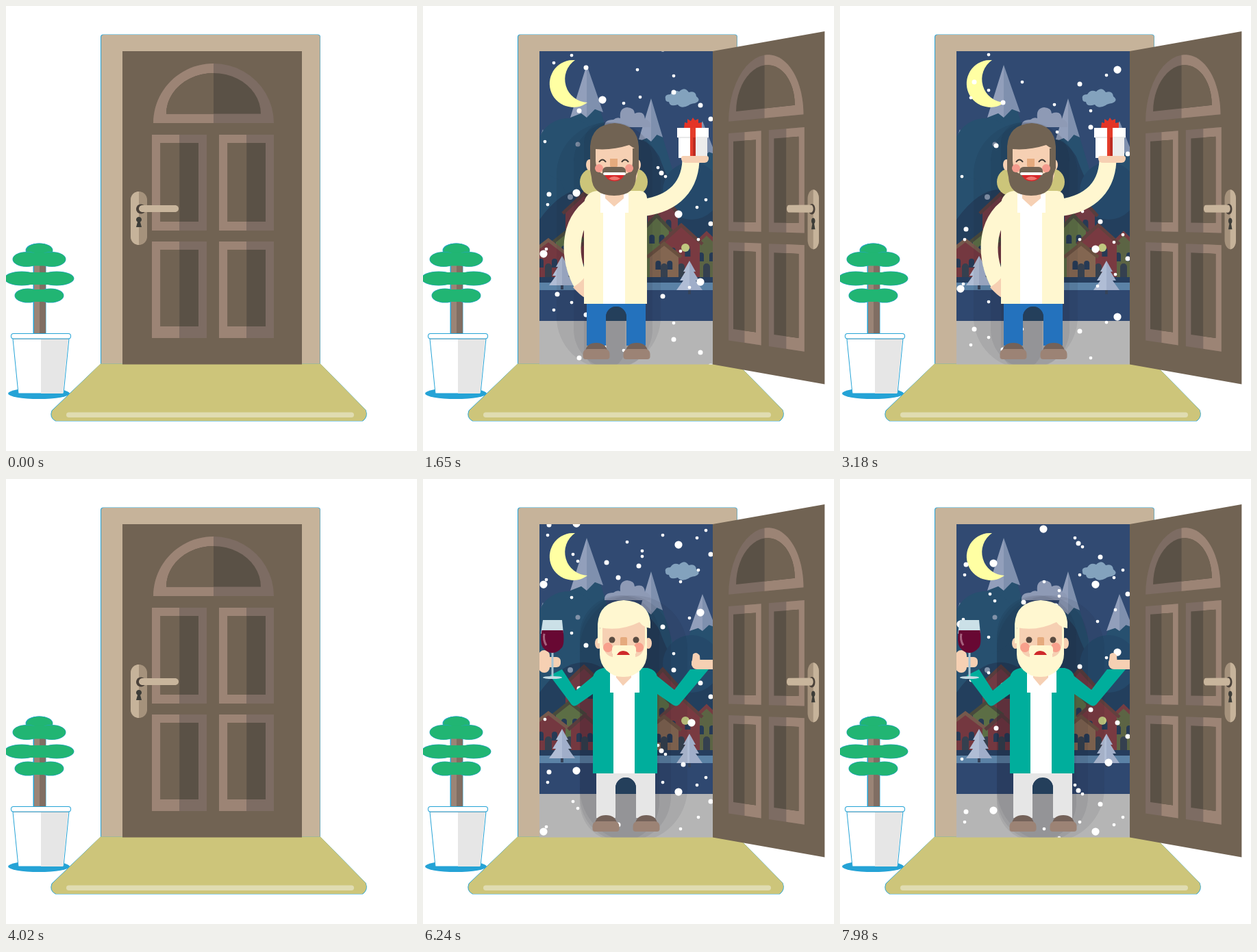
These frames come from a looping animation (600 by 650 pixels, 8000 ms). An HTML page with a canvas:

```html
<!DOCTYPE html>
<html lang="en">
<head>
<meta charset="utf-8">
<title>Winter visitors</title>
<style>
html, body { margin: 0; width: 100%; height: 100%; overflow: hidden; background: #fff; }
canvas { display: block; }
</style>
</head>
<body>
<canvas id="stage" width="600" height="650"></canvas>
<script>
const ctx = document.getElementById('stage').getContext('2d');
const PI = Math.PI;
const LOOP = 8000, SWING = 514;
const SKIN = '#f6d0b3', BROWN = '#716353', CREAM = '#fff7d0', TEAL = '#00ae9c', BLUE = '#25a3d6';

function shape(color, d, edge) {
  const path = new Path2D(d);
  ctx.fillStyle = color;
  ctx.fill(path);
  if (edge) { ctx.strokeStyle = edge; ctx.lineWidth = 1; ctx.stroke(path); }
}
function line(color, width, d) {
  ctx.strokeStyle = color;
  ctx.lineWidth = width;
  ctx.stroke(new Path2D(d));
}
function rect(color, x, y, w, h, r = 0) {
  ctx.fillStyle = color;
  ctx.beginPath();
  ctx.roundRect(x, y, w, h, r);
  ctx.fill();
}
function oval(color, x, y, rx, ry = rx) {
  ctx.fillStyle = color;
  ctx.beginPath();
  ctx.ellipse(x, y, rx, ry, 0, 0, 2 * PI);
  ctx.fill();
}

// ---- Snow: one tile of flakes, x/y pairs grouped by size ----
const TILE = 361;
const snow = [
  { r: 5.6, at: [373,249, 176,307, 405,348, 262,82, 392,148, 224,218, 297,168] },
  { r: 3.5, at: [238,35, 350,8, 405,90, 228,98, 420,110, 366,71, 348,189, 380,209,
                 420,263, 315,280, 268,275, 285,297, 184,220, 196,5] },
  { r: 2.4, at: [313,38, 366,47, 293,87, 317,78, 217,17, 191,28, 266,5, 343,181, 354,194,
                 178,143, 182,235, 350,235, 400,239, 413,228, 298,245, 320,258, 320,266,
                 219,263, 226,273, 402,286, 376,303, 217,326, 180,300, 389,356] }
];
function drawSnow(t) {
  for (const { r, at } of snow)
    for (let i = 0; i < at.length; i += 2) {
      const y = (at[i + 1] + t / 30) % TILE;
      oval('#fff', at[i], y, r);
      oval('#fff', at[i], y + TILE, r);
    }
}

// ---- Landscape ----
function peak(x, y, left, right, capY, slope) {
  const h = capY - y;
  shape('#27506f', `M${x} ${y}L${x - slope * 230} ${y + 230}H${x + slope * 230}Z`);
  shape('#929fbb', `M${x} ${y}L${x - left} ${capY}L${x - left / 3} ${capY - h * .08}L${x} ${capY}Z`);
  shape('#7f90ae', `M${x} ${y}L${x + right} ${capY - h * .1}L${x + right / 2} ${capY - h * .16}L${x} ${capY}Z`);
}
function house(x, top, half, eaves, wall, roof) {
  shape(wall, `M${x} ${top}L${x + half} ${eaves}V396H${x - half}V${eaves}Z`);
  line(roof, 5, `M${x - half - 4} ${eaves + 3}L${x} ${top}L${x + half + 4} ${eaves + 3}`);
  rect('#263a55', x - half * .6, eaves + 8, 8, 13, [4, 4, 0, 0]);
  rect('#263a55', x + half * .2, eaves + 8, 8, 13, [4, 4, 0, 0]);
  rect('#35404f', x - 5, 376, 10, 20, [5, 5, 0, 0]);
}
function pine(x, y) {
  rect('#36435a', x - 2, y + 40, 4, 9);
  const tiers = side => `M${x} ${y}L${x + 9 * side} ${y + 16}L${x + 6 * side} ${y + 16}L${x + 14 * side} ${y + 29}` +
    `L${x + 9 * side} ${y + 29}L${x + 19 * side} ${y + 43}H${x}Z`;
  shape('#b0bdd5', tiers(-1));
  shape('#a0aec9', tiers(1));
}
function landscape() {
  rect('#314a72', 170, 66, 262, 394);
  peak(239, 86, 24, 24, 163, .3);
  peak(175, 180, 14, 11, 222, .35);
  peak(408, 168, 19, 19, 222, .32);
  peak(333, 135, 19, 17, 198, .3);
  shape('#233f5d', 'M170 312Q215 250 260 275Q300 150 345 220Q380 320 432 290V400H170Z');
  oval('#27506f', 212, 210, 46);
  oval('#25496a', 392, 270, 42);
  shape('#8e9ab5', 'M265 177Q264 166 278 166Q283 162 288 164Q286 149 298 148Q309 149 309 157Q323 152 324 165Q333 167 332 177Z');
  shape('#83a2bd', 'M354 136Q352 129 361 129Q366 121 374 125Q382 117 388 126Q398 123 399 132Q407 138 397 142Q390 143 388 145Q377 151 372 144Q360 148 359 140Q354 140 354 136Z');
  shape('#ffffa3', 'M222 79A34.5 34.5 0 1 0 240 141A34 34 0 0 1 222 79Z');

  house(235, 274, 27, 300, '#713a43', '#593d3d');
  house(350, 278, 22, 304, '#713a43', '#593d3d');
  house(214, 326, 20, 342, '#5c6e45', '#494a3c');
  house(341, 306, 18, 326, '#5c6e45', '#494a3c');
  house(183, 342, 25, 361, '#743840', '#76594c');
  house(236, 345, 20, 363, '#743840', '#593d3d');
  house(414, 332, 20, 352, '#5c6444', '#763d42');
  house(377, 320, 27, 345, '#793a41', '#63403e');
  house(352, 347, 21, 364, '#836651', '#69503f');
  oval('#c0c77f', 383, 353, 6);

  rect('#263e5e', 170, 396, 262, 9);
  rect('#5b82a6', 170, 404, 262, 11);
  rect('#2f4870', 170, 415, 262, 45);
  rect('#b5b5b5', 170, 460, 262, 64);
  pine(203, 365);
  pine(389, 372);
  oval('#8292a8', 226, 202, 3.5);
  oval('#8292a8', 215, 279, 4);
}
function shadeBehind(bands) {
  for (const [x0, x1] of bands) rect('rgba(20,25,30,.07)', x0, 170, x1 - x0, 360, (x1 - x0) / 2);
}

// ---- People ----
function legs(color, x, y, bottom) {
  shape(color, `M${x - 43} ${y}H${x + 43}V${bottom}H${x + 15}V${y + 21}A15 15 0 0 0 ${x - 15} ${y + 21}V${bottom}H${x - 43}Z`);
  shape('#243f5b', `M${x - 15} 460V${y + 21}A15 15 0 0 1 ${x + 15} ${y + 21}V460Z`);
  for (const foot of [x - 29, x + 30]) {
    shape('#746259', `M${foot - 16} ${bottom + 8}Q${foot - 14} ${bottom - 4} ${foot} ${bottom - 4}Q${foot + 14} ${bottom - 4} ${foot + 16} ${bottom + 8}Z`);
    rect('#9c8375', foot - 19.5, bottom + 5, 39, 15, [7, 7, 4, 4]);
  }
}
function giftVisitor() {
  legs('#2472bd', 282, 433, 496);
  rect('#ccc57a', 229, 237, 99, 40, 20);
  line(CREAM, 25, 'M249 291C211 315 211 370 233 407');
  line(CREAM, 25, 'M315 295C358 292 389 270 391 226');
  shape(SKIN, 'M219 411Q233 402 239 392Q252 399 251 413Q248 424 236 426Q230 423 219 411Z');
  rect(CREAM, 235, 270, 92, 165, [20, 10, 0, 0]);
  rect('#fff', 263, 285, 32, 150);
  shape('#fff', 'M259 274H300V302H259Z');
  shape(SKIN, 'M266 272H293V281L279 293L266 281Z');

  oval(SKIN, 243, 232, 5, 8);
  oval(SKIN, 313, 232, 5, 8);
  rect(SKIN, 246, 182, 67, 90, 28);
  shape(BROWN, 'M244 240V205Q246 173 280 171Q313 173 315 205V210Q309 209 301 203Q276 211 252 209V226Q253 244 264 245H296Q306 243 306 226V208H315V237L311 248Q311 277 279 277Q247 277 246 250Z');
  oval('#f49b8d', 257, 237, 6);
  oval('#f49b8d', 301, 237, 6);
  shape('#e5aa7d', 'M273 223H284V234Q279 239 273 234Z');
  rect(BROWN, 262, 235, 34, 11, [6, 6, 2, 2]);
  shape('#d7282b', 'M264 244H295Q291 256 279 256Q268 256 264 244Z');
  rect('#fff', 263, 243, 33, 4, 2);
  shape('#ef7770', 'M271 252Q279 246 288 252Q280 257 271 252Z');
  line('#403a34', 2, 'M257 228Q262 221 267 228M290 228Q295 221 300 228');

  rect('#fff', 373, 191, 42, 31);
  rect('#ececec', 398, 193, 17, 29);
  rect('#fff', 371, 178, 46, 14);
  rect('#d4d4d4', 372, 191.5, 44, 1);
  rect('#e43c2a', 390, 178, 8, 44);
  rect('#bd2c22', 394, 192, 4, 30);
  shape('#e43427', 'M381 178L382 170L386 171L386 165L391 168L394 163L397 167L402 165L402 171L407 170V178Z');
  rect(SKIN, 377, 219, 40, 10, [3, 3, 6, 6]);
}
function wineVisitor() {
  legs('#e6e6e6', 296, 430, 495);
  shape(TEAL, 'M263 276L223 309L203 278L185 287L215 327Q219 334 225 330L248 314Z');
  shape(TEAL, 'M327 276L367 308L390 278H417L376 327Q371 334 365 330L342 314Z');
  shape(TEAL, 'M248 430V290Q250 278 264 276H328Q341 279 342 290V430Z');
  rect('#fff', 278, 290, 31, 140);
  rect('#fff', 273, 278, 43, 34);
  shape(SKIN, 'M282 280H304V290L292 302L282 290Z');

  oval(SKIN, 256, 240, 5, 8);
  oval(SKIN, 329, 240, 5, 8);
  rect(CREAM, 258, 200, 69, 89, [20, 20, 33, 33]);
  shape(SKIN, 'M262 205H324V240Q322 258 310 260H277Q264 258 262 240Z');
  shape(CREAM, 'M255 240V212Q257 179 293 177Q329 179 332 209V218Q322 217 316 209Q288 223 258 217V240Z');
  oval('#f8a08c', 270, 246, 7);
  oval('#f8a08c', 315, 246, 7);
  oval('#5a4b41', 276, 235, 4.5);
  oval('#5a4b41', 311, 235, 4.5);
  rect('#e5aa7d', 288, 231, 10, 14, 2);
  rect(CREAM, 276, 243, 35, 12, [5, 5, 0, 0]);
  rect(CREAM, 277, 253, 33, 12);
  shape('#cf2a2b', 'M283 257Q286 251 292 251Q299 251 302 257Z');

  rect(SKIN, 392, 264, 36, 14, [4, 0, 0, 8]);
  shape(SKIN, 'M392 272L394 256Q399 251 404 258L405 272Z');
  rect(SKIN, 169, 250, 16, 33, 8);
  rect(SKIN, 175, 260, 26, 15, 6);
  line('#a9c6d4', 3, 'M189 252V290');
  oval('#c5dbe3', 189, 290, 14, 2);
  shape('#cbe0e7', 'M175 206H203L205 226H172Z');
  shape('#680833', 'M173.500 221H204.500Q207 240 203 246Q196 254 189 254Q181 254 175 246Q170 239 173.500 221Z');
  line('#a6617e', 3, 'M177 226Q175 235 180 243');
}

// ---- Entrance ----
function plant() {
  oval(BLUE, 48, 566, 45, 8);
  shape('#fff', 'M10 486H92L84 566H18Z', BLUE);
  shape('#e6e6e6', 'M51 486H91L83 566H51Z');
  rect('#b8b1b1', 11, 484, 80, 3);
  ctx.lineWidth = 1;
  rect(BLUE, 7, 478, 88, 8.500, 4);
  rect('#fff', 8, 479, 86, 6.500, 3);
  rect(BLUE, 39.500, 375, 19, 103);
  rect('#9b8476', 41, 375, 8, 103);
  rect('#806e63', 49, 375, 9, 103);
  const leaf = (x, y, rx, ry) => { oval(BLUE, x, y, rx + .5, ry + .5); oval('#21b573', x, y, rx, ry); };
  for (const [y, gap, rx, ry] of [[357, 0, 19, 10], [370, 18, 20, 10.5], [398, 25, 25, 10], [423, 16, 19, 10]]) {
    leaf(48 - gap, y, rx, ry);
    leaf(49 + gap, y, rx, ry);
    rect('#21b573', 49 - gap, y - ry + 1, 2 * gap, 2 * ry - 2);
  }
}
function step() {
  shape('#cdc57a', 'M138 523H459L525 590Q529 600 521 606H72Q63 601 67 591Z', BLUE);
  shape('#cdc57a', 'M138 522.500H459L525 590Q528 600 520 606H73Q64 601 68 591Z');
  rect('#e0dcb1', 88, 593.500, 420, 7.500, 4);
}

// ---- Door: flat coordinates projected around its hinge ----
function drawDoor(open, hinge) {
  const angle = open * 123.6 * PI / 180;
  const rise = 30 * Math.sin(.85 * angle);
  const near = 1 + 2 * rise / 457;
  const reach = -262 * Math.cos(angle) * near;
  const project = ([x, y]) => {
    const u = (432 - x) / 262;
    const f = (u / near) / (1 - u + u / near);
    return [hinge + reach * f, 66 - rise * f + (y - 66) * (1 + 2 * rise * f / 457)];
  };
  const face = (color, points) => {
    ctx.fillStyle = color;
    ctx.beginPath();
    points.forEach(p => ctx.lineTo(...project(p)));
    ctx.fill();
  };
  const block = (color, x0, y0, x1, y1) => face(color, [[x0, y0], [x1, y0], [x1, y1], [x0, y1]]);
  const arc = (cx, cy, rx, ry, from, to) => Array.from({ length: 25 }, (_, i) => {
    const a = from + (to - from) * i / 24;
    return [cx + rx * Math.cos(a), cy + ry * Math.sin(a)];
  });
  const arch = (y, rx, ry, light, dark) => {
    face(dark, arc(303, y, rx, ry, PI, 2 * PI));
    face(light, [[303, y], ...arc(303, y, rx, ry, PI, 1.5 * PI)]);
  };
  const panel = (x0, y0, x1, y1, light, dark) => {
    block(dark, x0, y0, x1, y1);
    block(light, x0, y0, (x0 + x1) / 2, y1);
  };
  const rim = ['#9c8475', '#7d6c63'], pane = [BROWN, '#5a5146'];

  block(BROWN, 170, 66, 432, 523.500);
  arch(171, 88, 87, ...rim);
  arch(157.500, 69, 59.500, ...pane);
  for (const x of [213, 311])
    for (const [y0, y1, in0, in1] of [[188, 328, 200, 315], [344, 485, 356, 468]]) {
      panel(x, y0, x + 80, y1, ...rim);
      panel(x + 12.500, in0, x + 68, in1, ...pane);
    }
  const top = 283, bottom = 337;
  face('#a5927c', [...arc(194, top, 12, 12, PI, 2 * PI), ...arc(194, bottom, 12, 12, 0, PI)]);
  face('#c6b39a', [...arc(194, bottom, 12, 12, PI / 2, PI), ...arc(194, top, 12, 12, PI, 1.5 * PI)]);
  face('#4a4139', arc(197, 296.500, 7, 7, 0, 2 * PI));
  face('#c8b59c', [...arc(199, 296, 5, 5, PI / 2, 1.5 * PI), ...arc(247, 296, 5, 5, -PI / 2, PI / 2)]);
  face('#3d3d38', arc(194, 312, 4, 4, 0, 2 * PI));
  face('#3d3d38', [[193, 312], [195, 312], [198, 323], [190, 323]]);
}

// ---- Timeline ----
function ease(t, start) {
  const p = Math.min(1, Math.max(0, (t - start) / SWING));
  return (1 - Math.cos(PI * p)) / 2;
}
function draw(t) {
  const open = ease(t, 167) - ease(t, 3440) + ease(t, 4767);
  const opening = t < 3000 || t > 4500;
  const hinge = 432 - 9 * open * open;

  ctx.clearRect(0, 0, 600, 650);
  if (opening && open > .03 && open < .7) oval(BLUE, 435, 273, 41);
  plant();
  rect(BLUE, 138, 41.500, 321, 482, [4, 4, 0, 0]);
  rect('#c6b39a', 139, 42, 319.500, 482, [4, 4, 0, 0]);
  step();

  if (open > 0) {
    ctx.save();
    ctx.beginPath();
    ctx.rect(170, 66, hinge - 170, 457.500);
    ctx.clip();
    landscape();
    const first = t < 4400;
    shadeBehind(first ? [[195, 347], [220, 335], [235, 295]] : [[229, 386], [229, 362], [229, 345]]);
    drawSnow(t);
    if (first) giftVisitor(); else wineVisitor();
    ctx.restore();
  }
  drawDoor(open, hinge);
}

const begin = performance.now();
function tick() {
  draw((performance.now() - begin) % LOOP);
  requestAnimationFrame(tick);
}
tick();
</script>
</body>
</html>
```
